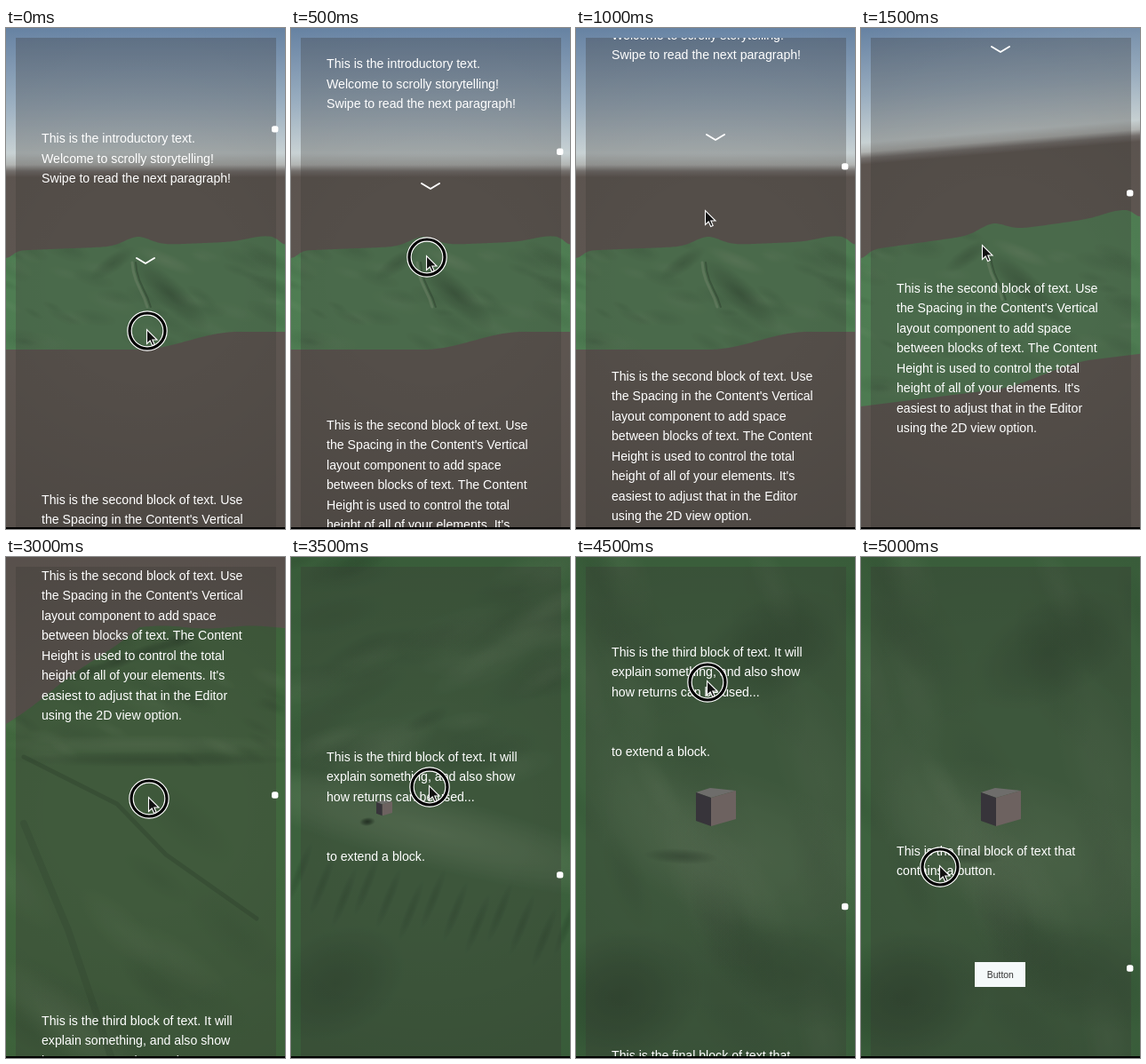
Animation, 314 px wide and 564 px high, one loop 10000 ms. Source, as an HTML page with a canvas:

```html
<!DOCTYPE html>
<html lang="en">
<head>
<meta charset="utf-8">
<title>Scrolly storytelling</title>
<style>
html, body { margin: 0; width: 100%; height: 100%; overflow: hidden; background: #000; }
canvas { display: block; }
</style>
</head>
<body>
<canvas id="stage" width="314" height="564"></canvas>
<script>
const W = 314, H = 564, LOOP = 10000, LINE = 22.45;
const ctx = document.getElementById('stage').getContext('2d');
const FONT = '"Liberation Sans", Arial, sans-serif';
const GROUND = '#5f5752', DARK = '20,40,24', LIGHT = '145,170,135';

// First baseline of each block in scroll space, then its lines.
const BLOCKS = [
  [129.3, ['This is the introductory text.', 'Welcome to scrolly storytelling!',
    'Swipe to read the next paragraph!']],
  [536, ['This is the second block of text. Use', "the Spacing in the Content's Vertical",
    'layout component to add space', 'between blocks of text. The Content',
    'Height is used to control the total', "height of all of your elements. It's",
    'easiest to adjust that in the Editor', 'using the 2D view option.']],
  [1037, ['This is the third block of text. It will', 'explain something, and also show',
    'how returns can be used...', '', '', 'to extend a block.']],
  [1491, ['This is the final block of text that', 'contains a button.']]
];

// The picture jumps from one pose to the next.
const STEPS = [
  { at: 0,    scroll: 0,    view: far,   x: 158, y: 339, press: true },
  { at: 500,  scroll: 84,   view: far,   x: 152, y: 256, press: true },
  { at: 1000, scroll: 139,  view: far,   x: 145, y: 205 },
  { at: 1500, scroll: 238,  view: tilt,  x: 136, y: 244 },
  { at: 2500, scroll: 283,  view: near,  x: 165, y: 427 },
  { at: 3000, scroll: 510,  view: near,  x: 160, y: 270, press: true },
  { at: 3500, scroll: 807,  view: above, x: 155, y: 257, press: true },
  { at: 4500, scroll: 925,  view: close, x: 147, y: 139, press: true },
  { at: 5000, scroll: 1155, view: close, x: 88,  y: 347, press: true }
];

const bump = (x, mid, width) => Math.exp(-(((x - mid) / width) ** 2));
const smooth = (a, b, x) => {
  const t = Math.min(1, Math.max(0, (x - a) / (b - a)));
  return t * t * (3 - 2 * t);
};

function trace(pts) {
  ctx.beginPath();
  pts.forEach(([x, y]) => ctx.lineTo(x, y));
}

function poly(pts, color) {
  trace(pts);
  ctx.closePath();
  ctx.fillStyle = color;
  ctx.fill();
}

function line(pts, color, width) {
  trace(pts);
  ctx.strokeStyle = color;
  ctx.lineWidth = width;
  ctx.lineJoin = ctx.lineCap = 'round';
  ctx.stroke();
}

// Soft elliptical patch of light or shade.
function blot(x, y, rx, ry, angle, rgb, alpha) {
  ctx.save();
  ctx.translate(x, y);
  ctx.rotate(angle);
  ctx.scale(rx, ry);
  const g = ctx.createRadialGradient(0, 0, 0, 0, 0, 1);
  g.addColorStop(0, `rgba(${rgb},${alpha})`);
  g.addColorStop(0.5, `rgba(${rgb},${alpha * 0.6})`);
  g.addColorStop(1, `rgba(${rgb},0)`);
  ctx.fillStyle = g;
  ctx.fillRect(-1, -1, 2, 2);
  ctx.restore();
}

function grain(seed, count, top, bottom, size, angle) {
  const rnd = () => (seed = (seed * 16807) % 2147483647) / 2147483647;
  for (let i = 0; i < count; i++) {
    const x = rnd() * W, y = top + rnd() * (bottom - top), r = size * (0.5 + rnd());
    blot(x, y, r * 2, r * 0.7, angle + rnd() * 0.5, rnd() < 0.6 ? DARK : LIGHT, 0.1);
  }
}

function fill(color) {
  ctx.fillStyle = color;
  ctx.fillRect(0, 0, W, H);
}

function sky(horizon, slope) {
  ctx.save();
  ctx.transform(1, slope, 0, 1, 0, 0);
  const end = horizon + 8, g = ctx.createLinearGradient(0, 0, 0, end);
  g.addColorStop(0, '#6f8db0');
  g.addColorStop(0.5, '#a3b8cb');
  g.addColorStop(0.84, '#d0dadc');
  g.addColorStop((horizon - 6) / end, '#b9bcba');
  g.addColorStop((horizon + 1) / end, '#787370');
  g.addColorStop(1, GROUND);
  ctx.fillStyle = g;
  ctx.fillRect(0, -60, W, H + 120);
  ctx.restore();
}

// Fill between two height functions and paint the relief inside.
function land(top, bottom, color, relief) {
  const xs = Array.from({ length: W / 2 + 1 }, (_, i) => i * 2);
  ctx.save();
  poly([...xs.map(x => [x, top(x)]), ...xs.reverse().map(x => [x, bottom(x)])], color);
  ctx.clip();
  relief();
  ctx.restore();
}

const ridge = x => 251 - 0.04 * x - 10 * bump(x, 148, 20) - 5 * bump(x, 290, 25)
  + 8 * bump(x, 0, 10) + 7 * bump(x, W, 9);
const shore = x => 362 - 20 * smooth(150, 260, x);

function hills(drop, slope) {
  const lift = x => slope * x;
  land(x => ridge(x) + lift(x), x => shore(x) + drop + 1.25 * lift(x), '#507f54', () => {
    ctx.translate(0, lift(148) + drop * 0.1);
    grain(17, 50, 240, 360 + drop, 12, 0.1 + slope);
    blot(185, 300, 58, 16, 0.75, DARK, 0.32);
    blot(120, 265, 30, 10, -0.6, DARK, 0.25);
    blot(180, 262, 36, 9, 0.4, LIGHT, 0.25);
    const gully = dx => Array.from({ length: 6 }, (_, i) =>
      [142 + dx + 3 * i - 2 * Math.sin(i), 264 + 10 * i]);
    line(gully(0), `rgba(${LIGHT},.4)`, 3);
    line(gully(4), `rgba(${DARK},.35)`, 2);
  });
}

function far() {
  sky(160, 0);
  hills(0, 0);
}

function tilt() {
  sky(146, -0.083);
  hills(64, -0.1);
}

function near() {
  fill(GROUND);
  land(x => 79 + 109 * Math.max(0, 1 - x / 150) + 1.5 * Math.sin(x / 16), () => H, '#42693f', () => {
    grain(43, 40, 90, 235, 15, 0.1);
    grain(71, 14, 260, 560, 34, 0.5);
    for (let i = 0; i < 4; i++) blot(90 + 35 * i, 130 - 12 * i, 26, 8, -0.3, DARK, 0.4);
    blot(155, 211, 180, 11, 0, LIGHT, 0.18);
    blot(165, 228, 165, 9, 0, DARK, 0.3);
    line([[20, 225], [125, 278], [180, 335], [282, 407]], `rgba(${DARK},.25)`, 5);
    line([[20, 300], [70, 420], [118, 562]], `rgba(${DARK},.14)`, 8);
  });
}

function above() {
  fill('#3d633e');
  grain(91, 50, 0, 240, 26, -0.6);
  blot(157, 308, 260, 42, 0.25, LIGHT, 0.32);
  for (let i = 0; i < 13; i++) {
    blot(10 + i * 25, 355 + i * 5 + (i % 3) * 9, 38, 6, 1.95, DARK, 0.22);
  }
  blot(50, 480, 85, 60, -0.5, DARK, 0.28);
  blot(86, 298, 9, 5, -0.1, DARK, 0.95);
}

function close() {
  fill('#3e643f');
  grain(57, 26, 0, 560, 46, 0.9);
  blot(190, 330, 190, 85, 0.35, LIGHT, 0.2);
  blot(215, 105, 100, 55, -0.5, DARK, 0.25);
  blot(50, 495, 95, 75, -0.3, DARK, 0.38);
  blot(245, 470, 110, 55, 0.4, DARK, 0.22);
  blot(118, 337, 42, 9, 0.05, DARK, 0.4);
}

function cube(x, y, s) {
  const left = [0, 5], back = [16, 0], right = [45, 3], front = [17, 11];
  const low = ([px, py]) => [px, py + 32];
  const face = (pts, color) => poly(pts.map(([px, py]) => [x + px * s, y + py * s]), color);
  face([left, back, right, front], '#6e6d6b');
  face([left, front, low(front), low(left)], '#37343a');
  face([front, right, low(right), low(front)], '#6d6260');
}

function panel() {
  ctx.fillStyle = 'rgba(60,56,54,.3)';
  ctx.fillRect(11, 11, 293, 551);
  const g = ctx.createRadialGradient(157, 285, 100, 157, 285, 320);
  g.addColorStop(0, 'rgba(0,0,0,0)');
  g.addColorStop(1, 'rgba(0,0,0,.08)');
  fill(g);
}

function content(scroll) {
  ctx.save();
  ctx.beginPath();
  ctx.rect(11, 11, 293, 551);
  ctx.clip();
  ctx.translate(0, -scroll);
  ctx.fillStyle = '#fff';
  ctx.textAlign = 'left';
  ctx.font = '14.15px ' + FONT;
  for (const [top, lines] of BLOCKS) {
    lines.forEach((s, i) => ctx.fillText(s, 40, Math.round(top + i * LINE)));
  }
  line([[147, 259], [157, 265], [167, 259]], '#fff', 2);
  ctx.fillStyle = '#f5f9fa';
  ctx.fillRect(128, 1611, 57, 28);
  ctx.fillStyle = '#323232';
  ctx.font = '10.4px ' + FONT;
  ctx.textAlign = 'center';
  ctx.fillText('Button', 156.8, 1629);
  ctx.restore();
}

function handle(scroll) {
  ctx.fillStyle = '#fff';
  ctx.beginPath();
  ctx.roundRect(299, 110.2 + scroll * 0.3023, 7.4, 7.4, 2.5);
  ctx.fill();
}

function ring(x, y) {
  for (const [width, color] of [[5.5, '#fff'], [3.2, '#000']]) {
    ctx.beginPath();
    ctx.arc(x, y, 20, 0, Math.PI * 2);
    ctx.lineWidth = width;
    ctx.strokeStyle = color;
    ctx.stroke();
  }
}

function cursor(x, y) {
  ctx.save();
  ctx.translate(x + 0.5, y + 0.5);
  poly([[0, 0], [0, 16], [3.7, 12.5], [6.2, 18], [8.7, 17], [6.3, 11.5], [11.5, 11.5]], '#111');
  ctx.strokeStyle = '#fff';
  ctx.lineWidth = 1.1;
  ctx.lineJoin = 'miter';
  ctx.stroke();
  ctx.restore();
}

function draw({ view, scroll, x, y, press }) {
  view();
  panel();
  if (view === above) cube(96, 274, 0.4);
  if (view === close) cube(135, 260, 1);
  content(scroll);
  handle(scroll);
  if (press) ring(x + 1, y + 2);
  cursor(x, y);
  ctx.fillStyle = '#000';
  ctx.fillRect(0, 562, W, 2);
}

let start, shown;
function tick(now) {
  start ??= now;
  const t = (now - start) % LOOP;
  const step = STEPS.findLast(s => s.at <= t) || STEPS[0];
  if (step !== shown) draw(shown = step);
  requestAnimationFrame(tick);
}
draw(shown = STEPS[0]);
requestAnimationFrame(tick);
</script>
</body>
</html>
```
